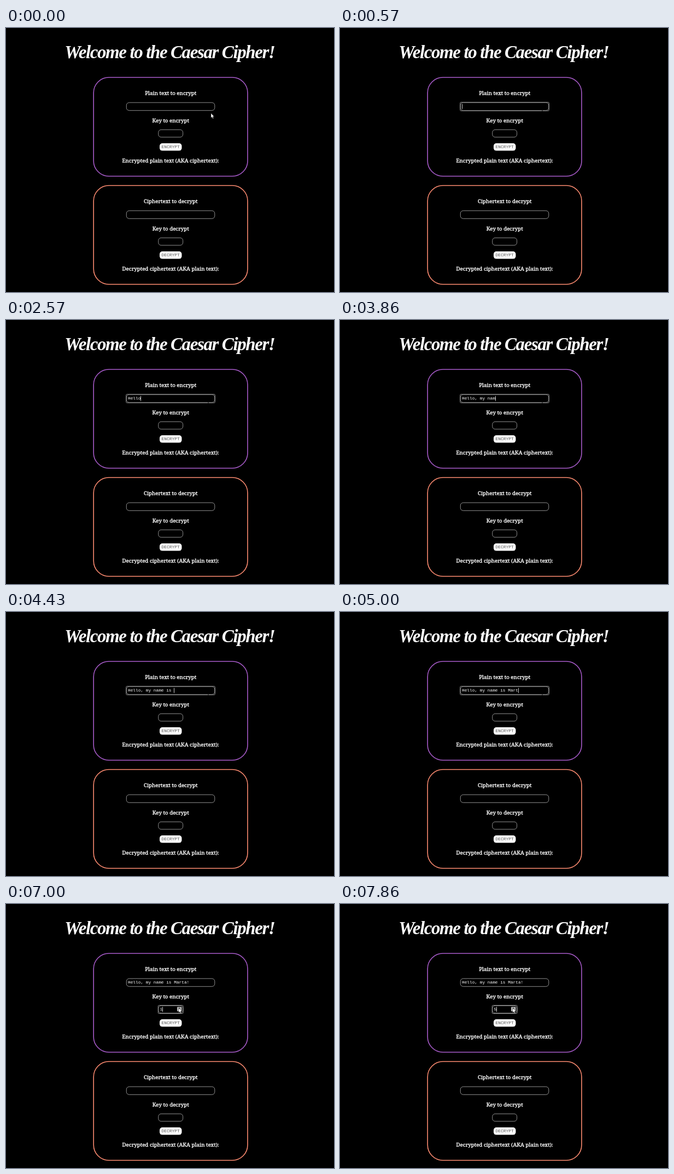
Write an HTML page that moves like this. It is 600 px wide and 481 px high and loops after 8000 ms.

```html
<!DOCTYPE html>
<html lang="en">
<head>
<meta charset="utf-8">
<title>Caesar Cipher</title>
<style>
html, body { margin: 0; width: 100%; height: 100%; overflow: hidden; background: #000; }
svg { display: block; }
text { fill: #fff; }
.title { font: italic bold 33px "Liberation Serif", serif; letter-spacing: -1.4px; text-anchor: middle; }
.label { font: 9.75px "Noto Serif", serif; text-anchor: middle; stroke: #fff; stroke-width: .35; }
.mono { font: 7.8px "Liberation Mono", monospace; white-space: pre; }
.button { font-size: 7.9px; text-anchor: middle; fill: #555; }
.panel { fill: none; stroke-width: 1.6; }
.field { fill: #000; stroke: #a0a0a0; stroke-width: .9; }
.ring { fill: none; stroke: #b8b8b8; stroke-width: .8; }
.caret { fill: #ccc; }
</style>
</head>
<body>
<svg id="stage" width="600" height="481" viewBox="0 0 600 481">
  <rect width="600" height="481"/>
  <text class="title" x="299.3" y="54.8">Welcome to the Caesar Cipher!</text>
  <g id="panels"></g>

  <rect id="plainRing" class="ring" x="219.8" y="135.3" width="162.5" height="15.6" rx="1.5"/>
  <rect id="beam" x="369.5" y="149.6" width="1" height="2.2"/>
  <text id="plain" class="mono" x="223" y="145"></text>
  <rect id="plainCaret" class="caret" y="138.5" width="1" height="9"/>

  <rect id="keyRing" class="ring" x="278.3" y="184.7" width="45.8" height="14.8" rx="1.5"/>
  <text id="key" class="mono" x="281.5" y="194.2"></text>
  <rect id="keyCaret" class="caret" x="286" y="187.5" width="1" height="9"/>
  <g id="spinner">
    <rect id="spinnerBox" x="313" y="187.5" width="8.5" height="8" rx="1.2" fill="#fff"/>
    <path d="M315.2 190.7l2-2 2 2zM315.2 192.5l2 2 2-2z" fill="#222"/>
  </g>
  <path id="arrow" d="M0 0V8.4L1.9 6.7L3.2 9.7L4.6 9.1L3.3 6.2H5.8Z" fill="#fff" stroke="#000" stroke-width=".4"/>
</svg>
<script>
const LOOP = 8000;
const MESSAGE = "Hello, my name is Marta!";
const CHAR = 4.68;
const $ = id => document.getElementById(id);

function panel(y, color, source, verb, result) {
  const field = (x, top, w, h) =>
    `<rect class="field" x="${x}" y="${top}" width="${w}" height="${h}" rx="5"/>`;
  const label = (top, words) => `<text class="label" x="301.2" y="${top}">${words}</text>`;
  return `<g transform="translate(0 ${y})">
    <rect class="panel" stroke="${color}" x="160.2" width="281.8" height="180" rx="28"/>
    ${label(32, `${source} to ${verb}`)}${field(220.3, 45.9, 161.5, 14.4)}
    ${label(81.5, `Key to ${verb}`)}${field(278.8, 95.3, 44.8, 13.6)}
    <rect x="281" y="120" width="40.5" height="13.6" rx="5" fill="#fff"/>
    <text class="mono button" x="301.2" y="129">${verb.toUpperCase()}</text>
    ${label(155.3, result)}
  </g>`;
}

$("panels").innerHTML =
  panel(90, "#a75bc9", "Plain text", "encrypt", "Encrypted plain text (AKA ciphertext):") +
  panel(287, "#fa8a70", "Ciphertext", "decrypt", "Decrypted ciphertext (AKA plain text):");

// Each track lists [start in ms, value].
const typed = [
  [0, 0], [1860, 1], [2000, 2], [2140, 3], [2290, 4], [2430, 5],
  [2860, 6], [3000, 7], [3140, 8], [3290, 9], [3570, 11], [3860, 13],
  [4000, 14], [4140, 15], [4290, 17], [4430, 18], [4570, 19], [4710, 20],
  [4860, 21], [5000, 22], [5140, 23], [5570, 24]
];
const caret = [[0, 0], [570, 1], [1000, 0], [1570, 1], [6140, 0], [6570, 1], [7000, 0]];
const focus = [[0, ""], [570, "plain"], [7000, "key"]];
const keyValue = [[0, ""], [7000, "1"], [7290, "2"], [7430, "3"], [7710, "4"], [7860, "5"]];
const pointer = [[0, [375, 155.3]], [140, null], [6860, [316, 189.5]]];

function at(track, t) {
  let value;
  for (const [start, v] of track) if (t >= start) value = v;
  return value;
}

function show(id, on) {
  $(id).style.display = on ? "" : "none";
}

function draw(now) {
  const t = now % LOOP;
  const count = at(typed, t);
  const active = at(focus, t);
  const spot = at(pointer, t);

  $("plain").textContent = MESSAGE.slice(0, count);
  $("plainCaret").setAttribute("x", Math.round(223 + count * CHAR));
  show("plainCaret", at(caret, t));
  show("plainRing", active === "plain");
  show("beam", t >= 140 && t < 6140);

  $("key").textContent = at(keyValue, t);
  show("keyRing", active === "key");
  show("keyCaret", active === "key");
  show("spinner", t >= 6290);
  $("spinnerBox").setAttribute("fill", active === "key" ? "#bbb" : "#fff");

  show("arrow", spot);
  if (spot) $("arrow").setAttribute("transform", `translate(${spot})`);
  requestAnimationFrame(draw);
}
draw(performance.now());
</script>
</body>
</html>
```
